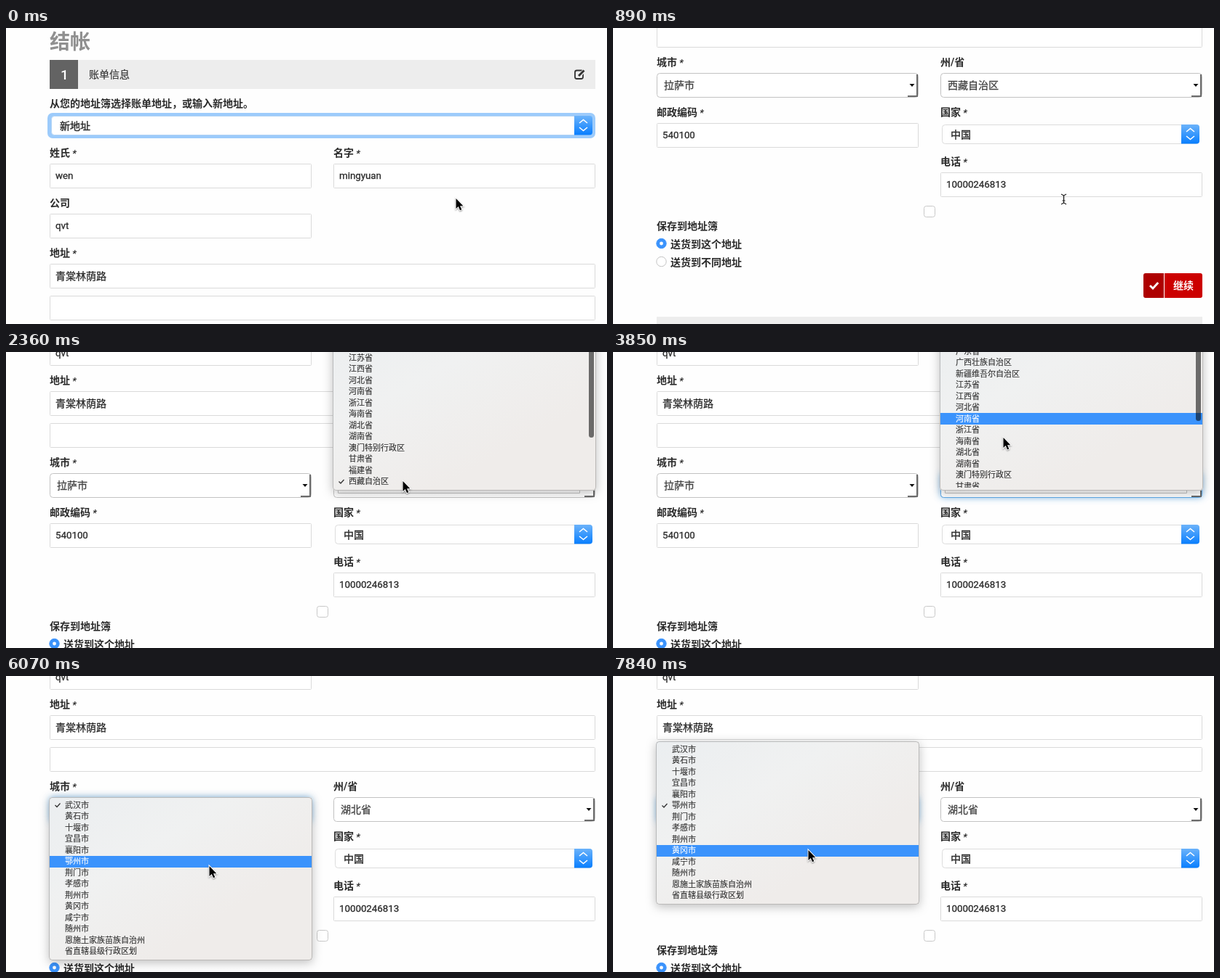
An HTML page with a canvas for the animation above (7.99 s loop, 826 by 408 pixels).

```html
<!DOCTYPE html>
<html lang="zh-CN">
<head>
<meta charset="utf-8">
<title>结帐</title>
<style>
html, body { margin: 0; width: 100%; height: 100%; overflow: hidden; background: #fefefe; }
canvas { display: block; width: 100vw; height: 100vh; }
</style>
</head>
<body>
<canvas id="stage" width="826" height="408"></canvas>
<script>
const ctx = document.getElementById('stage').getContext('2d');
const LOOP = 7990, STEPS = 54, STEP = LOOP / STEPS;
const FONT = "Roboto, 'Noto Sans CJK SC', 'Noto Sans CJK', sans-serif";
const LEFT = 60, RIGHT = 450, HALF = 360, FULL = 750;
const FIELD_GAP = 69, LIST_ROW = 15.5;
const INK = '#2b2b2b', BLUE = '#3b93fc';

const provinces = ['山东省', '山西省', '广东省', '广西壮族自治区', '新疆维吾尔自治区', '江苏省', '江西省',
  '河北省', '河南省', '浙江省', '海南省', '湖北省', '湖南省', '澳门特别行政区', '甘肃省', '福建省', '西藏自治区'];
const cities = ['武汉市', '黄石市', '十堰市', '宜昌市', '襄阳市', '鄂州市', '荆门市', '孝感市', '荆州市',
  '黄冈市', '咸宁市', '随州市', '恩施土家族苗族自治州', '省直辖县级行政区划'];

function ease(k, from, to) {
  const t = Math.min(1, Math.max(0, (k - from) / (to - from)));
  return t * t * (3 - 2 * t);
}
const during = (k, from, to) => k >= from && k < to;
const scrollAt = k => Math.round(376 * ease(k, 0, 6) - 105 * ease(k, 6, 13));
const listShiftAt = k => 2.42 * LIST_ROW * ease(k, 21, 25);

function pointerAt(k) {
  const toProvince = ease(k, 10, 15), upList = ease(k, 18, 20), downList = ease(k, 21, 28);
  const toCity = ease(k, 31, 37), pickCity = ease(k, 39, 41), reopen = ease(k, 45, 49);
  return {
    x: 618 - 73 * toProvince - 9 * upList - 218 * toCity - 39 * pickCity - 11 * reopen,
    y: 235 - 57 * toProvince - 116 * upList + 70 * downList + 46 * toCity
      + 84 * (pickCity - reopen) + 62 * ease(k, 51, 53),
  };
}

function text(s, x, cy, { size = 14, weight = 400, color = INK, thick = 0 } = {}) {
  ctx.font = `${weight} ${size}px ${FONT}`;
  ctx.fillStyle = ctx.strokeStyle = color;
  const y = cy + size * 0.37;
  ctx.fillText(s, x, y);
  if (thick) {
    ctx.lineWidth = thick;
    ctx.strokeText(s, x, y);
  }
}

function rect(x, y, w, h, fill) {
  ctx.fillStyle = fill;
  ctx.fillRect(x, y, w, h);
}

function paint(fill, stroke, width = 1) {
  if (fill) { ctx.fillStyle = fill; ctx.fill(); }
  if (stroke) { ctx.strokeStyle = stroke; ctx.lineWidth = width; ctx.stroke(); }
}

function round(x, y, w, h, r, fill, stroke) {
  ctx.beginPath();
  ctx.roundRect(x, y, w, h, r);
  paint(fill, stroke);
}

function circle(x, y, r, fill, stroke) {
  ctx.beginPath();
  ctx.arc(x, y, r, 0, 2 * Math.PI);
  paint(fill, stroke);
}

function line(points, stroke, width, fill) {
  ctx.beginPath();
  points.forEach(([x, y]) => ctx.lineTo(x, y));
  if (fill) ctx.closePath();
  paint(fill, stroke, width);
}

function tick(x, cy, size, color, width) {
  line([[x, cy], [x + size, cy + size], [x + 2.8 * size, cy - size]], color, width);
}

function shadow(color, blur, dy, draw) {
  ctx.save();
  ctx.shadowColor = color;
  ctx.shadowBlur = blur;
  ctx.shadowOffsetY = dy;
  draw();
  ctx.restore();
}

function label(s, x, cy, required) {
  text(s, x, cy, { weight: 700 });
  if (required) text('*', x + s.length * 14 + 3, cy, { weight: 'italic 700', size: 13 });
}

function input(x, y, w, value = '') {
  round(x + 0.5, y + 0.5, w - 1, 33, 1, '#fff', '#dadada');
  const latin = /^\w*$/.test(value);
  text(value, x + 8, y + (latin ? 16.5 : 17), { size: latin ? 13.3 : 14, thick: 0.3 });
}

function field(name, x, cy, value, required, w = HALF) {
  label(name, x, cy, required);
  input(x, cy + 15, w, value);
}

function nativeSelect(x, y, w, value, focused) {
  if (focused) round(x - 5, y - 4, w + 9, 35, 7, '#9ccbfb');
  round(x + 0.5, y + 0.5, w - 1, 26, 4, '#fff', focused ? '#b4d4f4' : '#dcdcdc');
  const blue = ctx.createLinearGradient(0, y, 0, y + 27);
  blue.addColorStop(0, '#6cb3fa');
  blue.addColorStop(1, '#067dff');
  round(x + w - 25, y, 25, 26.5, [0, 4, 4, 0], blue);
  const cx = x + w - 12.5, cy = y + 13;
  for (const d of [-1, 1]) line([[cx - 5.5, cy + 3 * d], [cx, cy + 7.5 * d], [cx + 5.5, cy + 3 * d]], '#fff', 1.6);
  text(value, x + 12, y + 14, { thick: 0.4 });
}

function bevelSelect(x, y, value, { focused, inner, filled }) {
  const box = () => round(x + 0.5, y + 0.5, HALF - 1, 33, 4, '#fff', focused ? '#5fa9e6' : '#c2c2c2');
  if (focused) shadow('rgba(82,168,236,.6)', 8, 0, box);
  box();
  if (inner) round(x + 6.5, y + 4.5, 332, 23, 0, null, '#c4c4c4');
  if (filled) rect(x + 344, y + 1, 14, 31, '#ececec');
  line([[x + 345, y + 32], [x + 358, y + 32], [x + 358, y + 2]], '#6b6b6b', 2);
  line([[x + 347.5, y + 15], [x + 354.5, y + 15], [x + 351, y + 19]], null, 0, '#111');
  text(value, x + 10, y + 17, { color: '#444', thick: 0.3 });
}

function radio(cy, s, on) {
  circle(66.5, cy - 1, 6.7, on ? BLUE : '#fff', on ? BLUE : '#c4c4c4');
  if (on) circle(66.5, cy - 1, 2.4, '#fff');
  label(s, 79, cy);
}

function sectionBar(y) {
  rect(LEFT, y, FULL, 40, '#ededed');
}

function editIcon(x, y) {
  round(x, y, 11, 11.5, 2.5, null, null);
  paint(null, '#333', 1.8);
  line([[x + 5, y + 8], [x + 13, y]], '#ededed', 5);
  line([[x + 5, y + 7.5], [x + 12.5, y]], '#333', 2.8);
}

function header(k) {
  text('结帐', LEFT, 19, { size: 28, weight: 700, color: '#909090' });
  sectionBar(44);
  rect(LEFT, 44, 39, 40, '#636363');
  text('1', 75, 64, { size: 19, weight: 500, color: '#fff' });
  text('账单信息', 114, 64, { color: '#333', thick: 0.15 });
  editIcon(782, 58.5);
  label('从您的地址簿选择账单地址，或输入新地址。', LEFT, 104);
  nativeSelect(62, 121, 744, '新地址', k < 17);
}

function form(k) {
  let y = 172;
  field('姓氏', LEFT, y, 'wen', true);
  field('名字', RIGHT, y, 'mingyuan', true);
  y += FIELD_GAP;
  field('公司', LEFT, y, 'qvt');
  y += FIELD_GAP;
  field('地址', LEFT, y, '青棠林荫路', true, FULL);
  input(LEFT, y + 59, FULL);

  y += FIELD_GAP + 44;
  const city = k < 34 ? '拉萨市' : k < 45 ? '武汉市' : '鄂州市';
  label('城市', LEFT, y, true);
  bevelSelect(LEFT, y + 15, city, { focused: k >= 38, inner: k >= 36, filled: k >= 36 });
  label('州/省', RIGHT, y);
  bevelSelect(RIGHT, y + 15, k < 32 ? '西藏自治区' : '湖北省',
    { focused: during(k, 17, 38), inner: during(k, 14, 33), filled: during(k, 32, 38) });

  y += FIELD_GAP;
  field('邮政编码', LEFT, y, k < 34 ? '540100' : k < 47 ? '420100' : '420700', true);
  label('国家', RIGHT, y, true);
  nativeSelect(452, y + 17, 354, '中国', false);
  field('电话', RIGHT, y + FIELD_GAP - 1, '10000246813', true);
}

function footer() {
  round(427.5, 621.5, 15, 15, 3, '#fff', '#c8c8c8');
  label('保存到地址簿', LEFT, 649);
  radio(674, '送货到这个地址', true);
  radio(699, '送货到不同地址', false);
  round(729, 714, 28, 34, [3, 0, 0, 3], '#ae0000');
  round(758, 714, 52, 34, [0, 3, 3, 0], '#cc0000');
  tick(738, 731, 4, '#fff', 2.8);
  text('继续', 770, 731, { weight: 700, color: '#fff' });
  sectionBar(774);
}

function menu(x, y, h, rows, firstY, checked, hoverY) {
  const fill = ctx.createLinearGradient(x, y, x + 140, y + h);
  fill.addColorStop(0, '#ebeef0');
  fill.addColorStop(0.5, '#f0f1f1');
  fill.addColorStop(1, '#efecea');
  shadow('rgba(0,0,0,.26)', 14, 3, () => round(x, y, 362, h, 4, fill));
  round(x + 0.5, y + 0.5, 361, h - 1, 4, null, 'rgba(0,0,0,.22)');
  ctx.save();
  ctx.beginPath();
  ctx.rect(x, y + 2, 362, h - 6);
  ctx.clip();
  const hover = Math.round((hoverY - firstY) / LIST_ROW);
  rows.forEach((s, i) => {
    const cy = firstY + i * LIST_ROW;
    if (i === hover) rect(x + 1, Math.round(cy - 7.7), HALF, 16, BLUE);
    const color = i === hover ? '#fff' : '#333';
    if (i === checked) tick(x + 8.5, cy, 2.5, color, 1.3);
    text(s, x + 22, cy - 0.5, { size: 11, color, thick: 0.15 });
  });
  ctx.restore();
}

function menus(k) {
  if (during(k, 16, 32)) {
    const shift = listShiftAt(k);
    const firstY = 178.5 - (provinces.length - 1) * LIST_ROW + shift;
    // The long list highlights late while it scrolls.
    const hoverY = during(k, 17, 31) ? pointerAt(k - 2).y : NaN;
    menu(449, -60, 251, provinces, firstY, provinces.length - 1, hoverY);
    round(801, -40, 7, 158 - shift * 0.61, 3.5, 'rgba(0,0,0,.55)');
  }
  const hoverY = during(k, 39, 44) || k >= 51 ? pointerAt(k).y : NaN;
  if (during(k, 38, 45)) menu(59, 167, 225, cities, 178, 0, hoverY);
  if (k >= 51) menu(59, 90, 225, cities, 101, 5, hoverY);
}

function pointer(k) {
  const { x, y } = pointerAt(k);
  ctx.save();
  ctx.translate(x, y);
  if (during(k, 5, 9)) {
    for (const side of [-2, 5]) line([[side, -6], [1.5, -4], [1.5, 6], [side, 8]], '#222', 1.2);
    line([[-0.5, 3], [3.5, 3]], '#222', 1);
  } else {
    const arrow = [[0.5, 0], [0.5, 14], [3.7, 11], [6, 16.3], [8.3, 15.3], [6, 10.2], [10.3, 10.2]];
    shadow('rgba(0,0,0,.35)', 2, 1, () => line(arrow, '#fff', 2, '#000'));
    line(arrow, null, 0, '#000');
  }
  ctx.restore();
}

function draw(time) {
  const k = Math.min(STEPS - 1, Math.floor((time % LOOP + 8) / STEP));
  rect(0, 0, 826, 408, '#fefefe');
  ctx.save();
  ctx.translate(0, -scrollAt(k));
  header(k);
  form(k);
  footer();
  ctx.restore();
  menus(k);
  pointer(k);
}

const start = performance.now();
function animate() {
  draw(performance.now() - start);
  requestAnimationFrame(animate);
}
animate();
</script>
</body>
</html>
```
